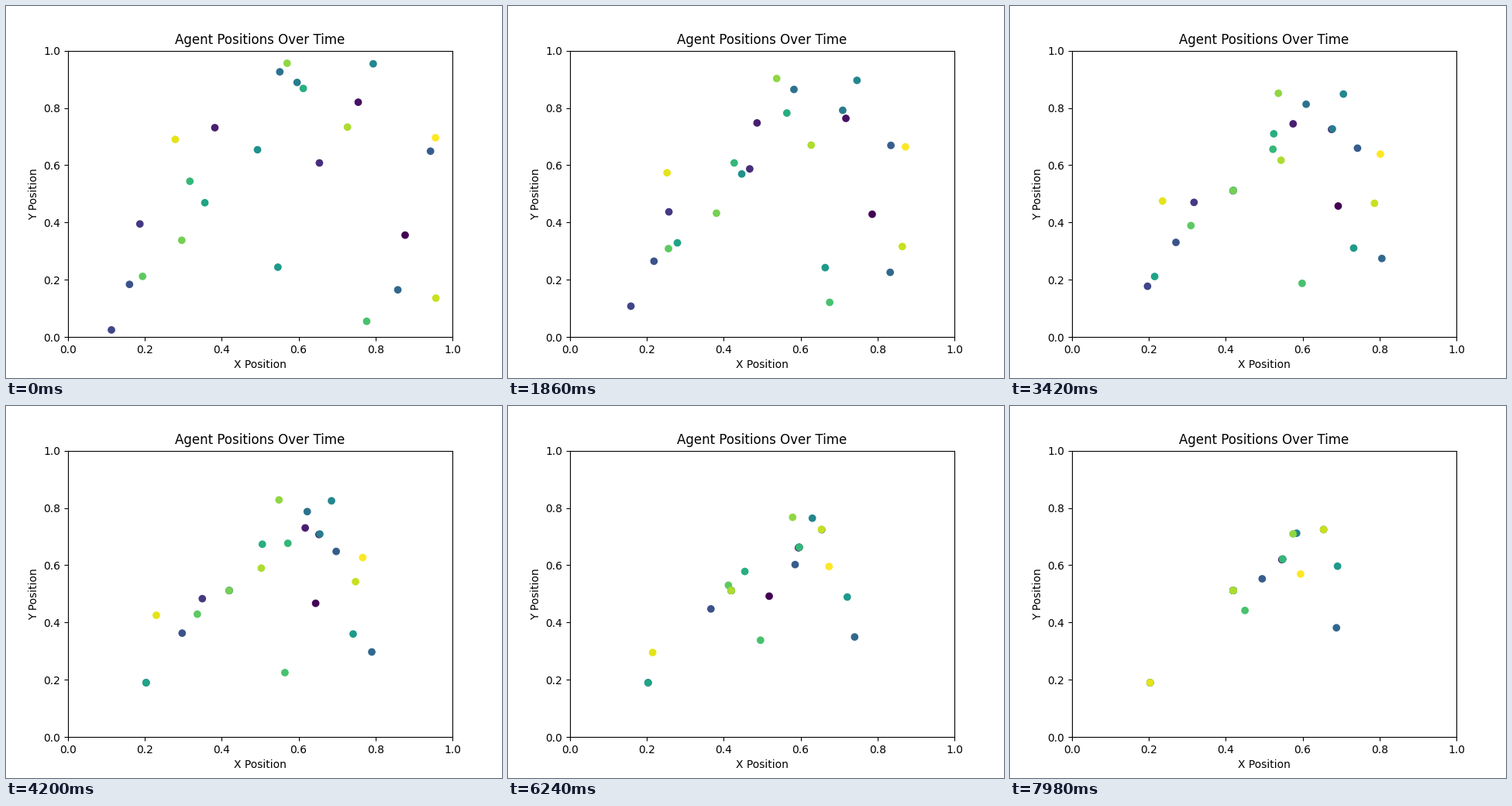
A matplotlib script that plays this animation: 640 by 480 pixels, repeating every 8000 ms.

```python
import matplotlib.pyplot as plt
import numpy as np
from matplotlib.animation import FuncAnimation

STEP_MS, TICK_MS, LOOP_MS = 60, 20, 8000
MAX_SHARE = 0.9  # part of the gap an agent may close in one step

# Per agent, in thousandths: start x, start y, speed; then the agent it follows
AGENTS = np.array([
    (877, 356, 3.78, 3), (755, 820, 2.20, 21), (382, 731, 3.42, 1),
    (654, 608, 6.29, 12), (187, 395, 2.65, 3), (113, 25, 3.05, 14),
    (160, 184, 3.22, 12), (943, 649, 3.57, 21), (858, 165, 2.13, 15),
    (551, 926, 2.23, 22), (596, 889, 4.95, 1), (794, 954, 2.41, 18),
    (493, 654, 3.11, 19), (546, 244, 3.86, 22), (356, 469, 5.15, 5),
    (612, 868, 3.17, 12), (317, 544, 4.11, 1), (777, 55, 3.91, 4),
    (194, 212, 3.71, 15), (296, 338, 4.13, 3), (570, 956, 2.02, 2),
    (727, 733, 3.80, 4), (957, 136, 6.53, 9), (279, 690, 3.85, 5),
    (956, 696, 2.88, 4),
])
START = AGENTS[:, :2] / 1000
SPEED = AGENTS[:, 2] / 1000
LEADER = AGENTS[:, 3].astype(int)


def advance(pos):
    """Move every agent towards its leader, settling once it is close."""
    gap = pos[LEADER] - pos
    dist = np.hypot(*gap.T)
    share = np.minimum(MAX_SHARE, SPEED / np.maximum(dist, 1e-12))
    return pos + gap * share[:, None]


path = [START]
for _ in range(LOOP_MS // STEP_MS):
    path.append(advance(path[-1]))

fig, ax = plt.subplots(figsize=(6.4, 4.8), dpi=100)
dots = ax.scatter(*START.T, c=np.arange(len(START)), cmap="viridis")
ax.set(xlim=(0, 1), ylim=(0, 1), title="Agent Positions Over Time",
       xlabel="X Position", ylabel="Y Position")


def update(tick):
    dots.set_offsets(path[tick * TICK_MS // STEP_MS])
    return (dots,)


anim = FuncAnimation(fig, update, frames=LOOP_MS // TICK_MS, interval=TICK_MS,
                     repeat=True, repeat_delay=0, blit=True)
plt.show()
```
